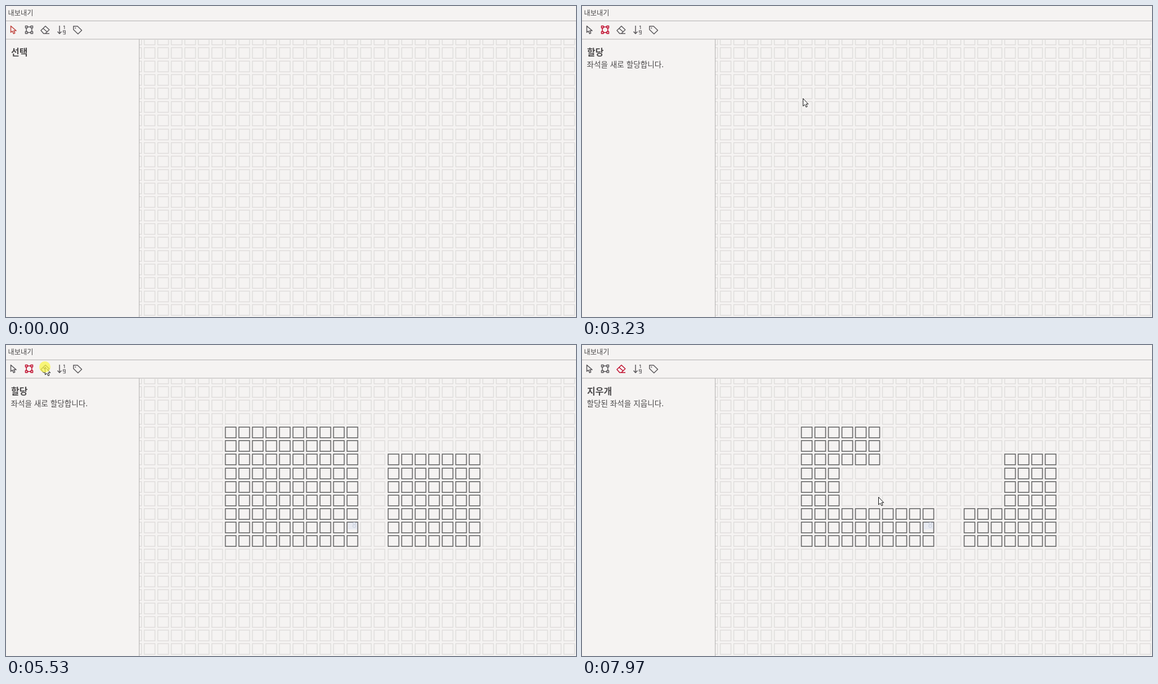
Recreate the animation shown at these times as an HTML page with a canvas. Size 1012x553 px, loop 8 s.

```html
<!DOCTYPE html>
<html lang="ko">
<head>
<meta charset="utf-8">
<style>
html, body { margin: 0; width: 100%; height: 100%; overflow: hidden; background: #f5f3f2; }
svg, canvas { position: absolute; left: 0; top: 0; }
text { font-family: "Noto Sans CJK KR", "Noto Sans CJK", sans-serif; fill: #4c4a4b; }
.icon { fill: none; stroke: #5c5a5d; stroke-width: 1.5; stroke-linejoin: round; }
</style>
</head>
<body>
<svg width="1012" height="553">
  <text x="3.5" y="16.5" font-size="12.2" font-weight="350">내보내기</text>
  <path d="M0 26.5H1012M0 59H1012M236.5 59V553" fill="none" stroke="#b3b1b1"/>
  <path class="icon" d="M8.5 35.5V47L11.3 44.7L13.6 49.3L15.8 48.2L13.7 43.9H18Z"/>
  <path class="icon" d="M34.5 35.5h3.5v3.5h-3.5zM44 35.5h3.5v3.5h-3.5zM34.5 45.5h3.5v3.5h-3.5zM44 45.5h3.5v3.5h-3.5zM38 37.2h6M38 47.2h6M36.2 39v6.5M45.8 39v6.5"/>
  <path class="icon" d="M62 43.5L70 35.8L76.8 42.2L69.8 49H66.8ZM65.8 39.8L73 46M67 49H77"/>
  <g class="icon">
    <path d="M95 35V49M91.5 45.5L95 49.3L98.5 45.5"/>
    <path d="M102 36.2L103.8 35.3V41M105.3 46.8H101.5V43.8H105.3V50H101.5" stroke-width="1.1"/>
  </g>
  <path class="icon" d="M119.8 36H127L134.5 43.2L127.8 49.7L119.8 42Z"/>
  <circle cx="123.3" cy="39.3" r="1" fill="#5c5a5d"/>
  <text id="title" x="9" y="88" font-size="16" font-weight="700"></text>
  <text id="hint" x="8.5" y="109" font-size="13.6" font-weight="350"></text>
</svg>
<canvas id="stage" width="1012" height="553"></canvas>
<script>
const LOOP = 8000, STEP = 70, LAG = 40;
const PITCH = 24.05, CELL = 20, LEFT = 244.6, TOP = 73.2;
const ctx = document.getElementById('stage').getContext('2d');
const title = document.getElementById('title');
const hint = document.getElementById('hint');
const icons = document.querySelectorAll('.icon');

const BURSTS = [0, 180, 1010, 1840, 2320, 3160, 4000, 4840, 5180, 6010, 6850, 7690];

// Pointer gestures: start, end, destination, button action.
const MOVES = [
  [180, 940, 34, 37],
  [1010, 1770, 140, 82],
  [1770, 2120, 326, 155],
  [2320, 2670, 40, 44, 'click'],
  [2740, 3160, 392, 164],
  [3300, 3790, 614, 352.5, 'assign'],
  [3930, 4210, 690, 212],
  [4280, 5030, 838, 358, 'assign'],
  [5180, 5530, 69, 39, 'click'],
  [5740, 6200, 547, 118],
  [6220, 6580, 738, 287, 'erase'],
  [6710, 7200, 573, 223],
  [7270, 7830, 476, 280, 'erase'],
  [7830, 7970, 526, 270]
].map(([start, end, x, y, action]) => ({ start, end, x, y, action }));

MOVES.forEach((move, k) => {
  const before = MOVES[k - 1] || { x: 836, y: 401 };
  move.x0 = before.x;
  move.y0 = before.y;
  move.release = k + 1 < MOVES.length ? MOVES[k + 1].start : LOOP;
  move.isDrag = move.action === 'assign' || move.action === 'erase';
});
const DRAGS = MOVES.filter(move => move.isDrag);
const [assignClick, eraseClick] = MOVES.filter(move => move.action === 'click');

const TOOLS = [
  { from: 0, title: '선택', hint: '', color: '#c24b45' },
  { from: assignClick.release, title: '할당', hint: '좌석을 새로 할당합니다.', color: '#c00d2d' },
  { from: eraseClick.end + STEP, title: '지우개', hint: '할당된 좌석을 지웁니다.', color: '#c00d2d' }
];

const smooth = u => u * u * (3 - 2 * u);
const settle = (u, power) => 1 - (1 - u) ** power;
const mix = (a, b, f) => a + (b - a) * f;

function captureTime(t) {
  const start = BURSTS.filter(b => b <= t).pop();
  return start + Math.floor((t - start) / STEP) * STEP;
}

function pointer(t) {
  const move = MOVES.filter(m => m.start <= t).pop() || MOVES[0];
  const u = Math.min(1, Math.max(0, (t - move.start) / (move.end - move.start)));
  return {
    x: mix(move.x0, move.x, move.isDrag ? settle(u, 2.5) : smooth(u)),
    y: mix(move.y0, move.y, move.isDrag ? settle(u, 2.75) : smooth(u))
  };
}

// The selection trails slightly behind the pointer.
function dragRect(drag, t) {
  const p = pointer(Math.max(drag.start, Math.min(t, drag.release) - LAG));
  return { x: Math.min(drag.x0, p.x), y: Math.min(drag.y0, p.y),
           r: Math.max(drag.x0, p.x), b: Math.max(drag.y0, p.y) };
}

const isActive = (drag, t) => t >= drag.start && t < drag.release;
const hits = (rect, x, y) =>
  x + 0.5 < rect.r && x + CELL > rect.x && y + 0.5 < rect.b && y + CELL > rect.y;

function cellState(x, y, t, rects) {
  let state = 'empty';
  DRAGS.forEach((drag, k) => {
    const erasing = drag.action === 'erase';
    if (t < drag.start || !hits(rects[k], x, y)) return;
    if (t >= drag.release) state = erasing ? 'empty' : 'seat';
    else if (!erasing) state = 'preview';
    else if (state === 'seat') state = 'doomed';
  });
  return state;
}

const STROKES = {
  empty: ['#dfdddc', 1.5], preview: ['#999', 1.4], seat: ['#666', 1.6], doomed: ['#e5303b', 1.1]
};

function drawCell(x, y, state) {
  const left = Math.round(x) + 0.5, top = Math.round(y) + 1, size = CELL - 1;
  [ctx.strokeStyle, ctx.lineWidth] = STROKES[state];
  ctx.strokeRect(left, top, size, size);
  if (state !== 'doomed') return;
  ctx.beginPath();
  ctx.moveTo(left, top);
  ctx.lineTo(left + size, top + size);
  ctx.moveTo(left + size, top);
  ctx.lineTo(left, top + size);
  ctx.stroke();
}

function drawGrid(t, rects) {
  ctx.save();
  ctx.beginPath();
  ctx.rect(237, 59.5, 775, 494);
  ctx.clip();
  for (let row = -1; row < 20; row++) {
    for (let col = -1; col < 32; col++) {
      const x = LEFT + col * PITCH, y = TOP + row * PITCH;
      drawCell(x, y, cellState(x, y, t, rects));
    }
  }
  ctx.restore();
}

function drawLabel(text, x, y, color) {
  ctx.fillStyle = color;
  ctx.font = '13px Lato, sans-serif';
  ctx.fillText(text, x, y);
}

function drawSelection(drag, { x, y, r, b }) {
  const erasing = drag.action === 'erase';
  ctx.fillStyle = erasing ? 'rgba(196,20,46,.28)' : 'rgba(65,130,240,.43)';
  ctx.strokeStyle = erasing ? 'rgba(196,20,46,.35)' : 'rgba(50,110,220,.65)';
  ctx.lineWidth = 1.3;
  ctx.fillRect(x, y, r - x, b - y);
  ctx.strokeRect(x, y, r - x, b - y);
  if (erasing) return;
  const count = (lo, hi, origin) =>
    Math.floor((hi - 0.5 - origin) / PITCH) - Math.floor((lo - origin) / PITCH) + 1;
  drawLabel(count(x, r, LEFT) + '×' + count(y, b, TOP), r + 3, b + 0.5, '#555a66');
}

// The size label leaves a faint digit behind.
function drawResidue() {
  ctx.fillStyle = 'rgba(120,160,230,.1)';
  ctx.fillRect(607, 315, 17, 13);
  drawLabel('8', 614.5, 325, '#c9d0de');
}

const arrow = new Path2D('M.5 .5V14L3.6 11.2L5.9 15.8L8 14.8L5.8 10.3H9.7Z');

function drawPointer(t) {
  const { x, y } = pointer(t);
  ctx.save();
  ctx.translate(Math.round(x), Math.round(y));
  ctx.fillStyle = '#fff';
  ctx.strokeStyle = '#111';
  ctx.lineWidth = 1;
  ctx.fill(arrow);
  ctx.stroke(arrow);
  const pressed = DRAGS.some(drag => isActive(drag, t)) ||
    [assignClick, eraseClick].some(c => t >= c.end && t < c.end + 2 * STEP);
  if (pressed) {
    ctx.fillStyle = 'rgba(250,245,70,.72)';
    ctx.beginPath();
    ctx.arc(0, 0, 10, 0, Math.PI * 2);
    ctx.fill();
  }
  ctx.restore();
}

function drawTool(t) {
  const tool = TOOLS.filter(s => s.from <= t).pop();
  title.textContent = tool.title;
  hint.textContent = tool.hint;
  icons.forEach((icon, k) => {
    icon.style.stroke = TOOLS[k] === tool ? tool.color : '';
  });
}

function render() {
  const t = captureTime(performance.now() % LOOP);
  const rects = DRAGS.map(drag => dragRect(drag, t));
  ctx.clearRect(0, 0, 1012, 553);
  drawTool(t);
  drawGrid(t, rects);
  if (t >= DRAGS[0].end) drawResidue();
  DRAGS.forEach((drag, k) => isActive(drag, t) && drawSelection(drag, rects[k]));
  if (t >= MOVES[0].start) drawPointer(t);
  requestAnimationFrame(render);
}
render();
</script>
</body>
</html>
```
